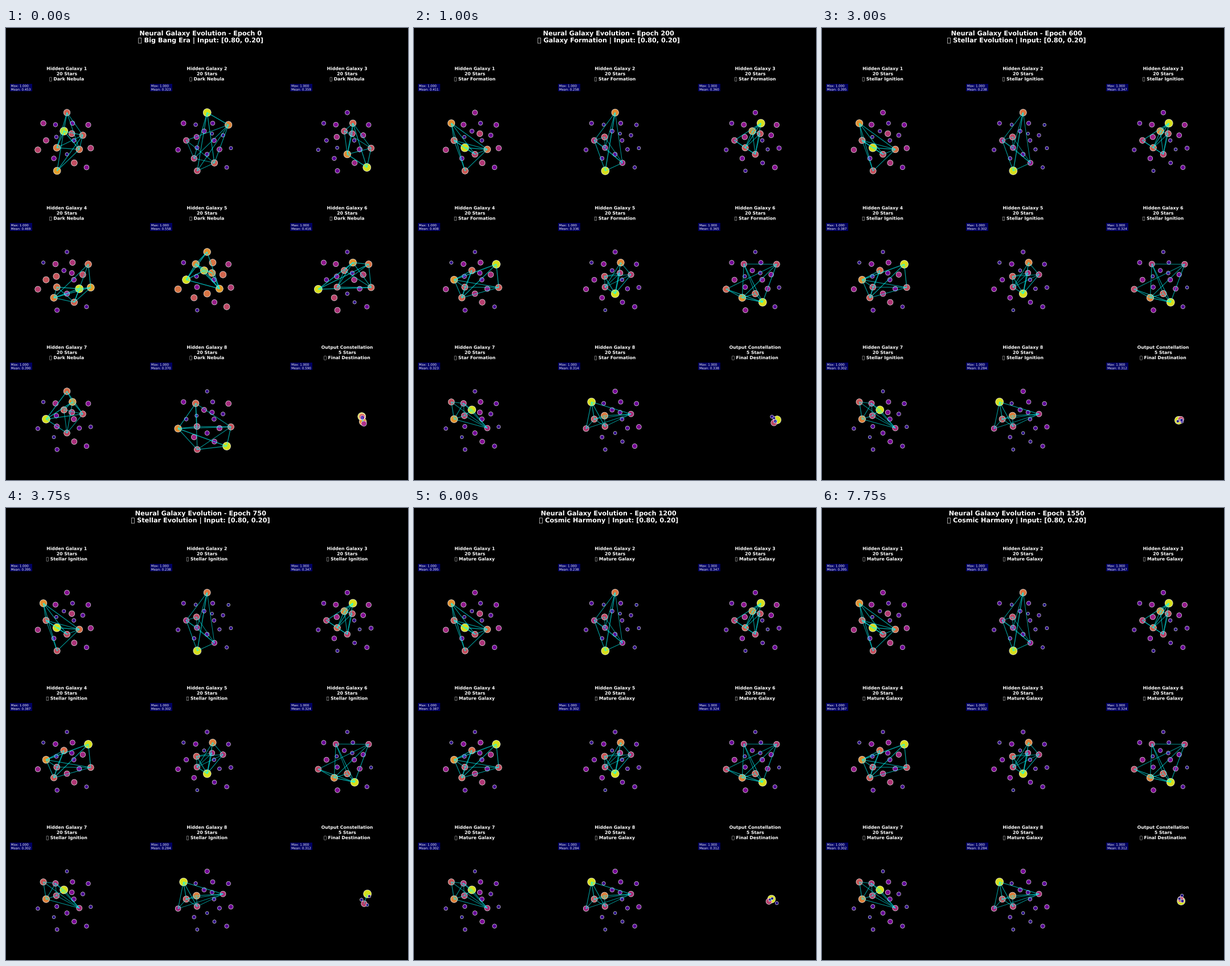
A matplotlib script for the animation above (8 s loop, 706 by 793 pixels).

```python
import itertools

import matplotlib.pyplot as plt
import numpy as np
from matplotlib.animation import FuncAnimation
from matplotlib.collections import LineCollection
from matplotlib.patches import Rectangle
from matplotlib.patheffects import Normal

W, H, DPI = 706, 793, 50
FRAMES, INTERVAL = 32, 250
COL, ROW = 246.2, 244.5
N_STARS, N_BRIGHT, N_OUT = 20, 6, 5
BOX = "\U0001F30C"  # has no glyph, so it shows as an empty box

plt.rcParams["font.family"] = "DejaVu Sans"

# Each galaxy: mean level and brightest stars, before and after learning
GALAXIES = [
    (.455, (2, 18, 4, 6, 15, 7), .395, (4, 16, 6, 10, 18, 5)),
    (.323, (15, 14, 12, 18, 11, 10), .238, (18, 15, 3, 10, 4, 12)),
    (.359, (19, 5, 8, 13, 2, 1), .347, (8, 2, 4, 1, 5, 10)),
    (.471, (6, 13, 11, 4, 14, 12), .387, (14, 10, 2, 11, 13, 4)),
    (.566, (10, 2, 6, 15, 9, 1), .302, (5, 8, 3, 4, 7, 1)),
    (.416, (17, 8, 14, 13, 2, 4), .324, (12, 11, 5, 17, 14, 9)),
    (.390, (10, 8, 15, 2, 7, 5), .302, (2, 10, 16, 3, 9, 6)),
    (.370, (19, 17, 9, 13, 18, 4), .284, (16, 3, 10, 4, 7, 17)),
]

ERAS = [(100, "Big Bang Era", "Dark Nebula"),
        (500, "Galaxy Formation", "Star Formation"),
        (1000, "Stellar Evolution", "Stellar Ignition"),
        (9999, "Cosmic Harmony", "Mature Galaxy")]


def spread_levels(mean, bright, seed):
    """Bright stars fall off from 1; the others share what the mean leaves."""
    edge = 1.3 * mean
    top = edge + (1 - edge) * np.exp(-np.arange(N_BRIGHT) / 1.8)
    n_rest = N_STARS - N_BRIGHT
    share = (mean * N_STARS - top.sum()) / n_rest
    rest = share * np.linspace(0.2, 1.8, n_rest)
    levels = np.empty(N_STARS)
    dim = np.setdiff1d(np.arange(N_STARS), bright)
    levels[np.random.default_rng(seed).permutation(dim)] = np.minimum(rest, 0.95 * edge)
    levels[list(bright)] = top
    return levels


def learn(before, after, step):
    rate = np.exp(-step / 1.7)
    levels = before * rate + after * (1 - rate)
    return levels / levels.max()


def links(places, levels):
    """Join the brightest stars, each with the next three along the spiral."""
    count = N_BRIGHT if len(levels) == N_STARS else 2
    top = np.sort(np.argsort(levels)[-count:])
    for a, b in itertools.combinations(range(count), 2):
        if b - a <= 3:
            i, j = top[a], top[b]
            yield (places[i], places[j]), 1 + 1.5 * levels[i] * levels[j]


def output_places(step):
    rng = np.random.default_rng(step + 40)
    return np.clip(rng.normal((630.5, 687), 5, (N_OUT, 2)), (620, 677), (641, 697))


turn = np.arange(N_STARS)
angle = 6 * np.pi * turn / N_STARS
radius = 12.2 * (1 + turn / 5)
SPIRAL = np.column_stack([107 + radius * np.cos(angle), 197.2 - radius * np.sin(angle)])

LEVELS = [(spread_levels(m0, b0, cell), spread_levels(m1, b1, cell))
          for cell, (m0, b0, m1, b1) in enumerate(GALAXIES)]
LEVELS.append((np.linspace(1, 0.18, N_OUT), np.array([1, 0.5, 0.04, 0.02, 0])))

fig = plt.figure(figsize=(W / DPI, H / DPI), dpi=DPI, facecolor="black")
ax = fig.add_axes([0, 0, 1, 1])
ax.set_xlim(0, W)
ax.set_ylim(H, 0)
ax.axis("off")


def write(x, y, text, size, **style):
    # drawn as outlines, so that lines may sit between whole pixels
    return ax.text(x, y, text, size=size, color="white", va="baseline",
                   path_effects=[Normal()], **style)


def heading(x, y, text, size):
    return write(x, y, text, size, weight="bold", ha="center")


stars = ax.scatter([], [], edgecolors=(1, 1, 1, 0.9), linewidths=1, zorder=2)
lines = LineCollection([], colors="cyan", alpha=0.6, zorder=3)
ax.add_collection(lines, autolim=False)
epoch_text = heading(342.3, 13, "", 16.2)
era_text = heading(342, 25.2, "", 16.2)

offsets, states, means = [], [], []
for cell in range(9):
    dx, dy = cell % 3 * COL, cell // 3 * ROW
    offsets.append((dx, dy))
    name, count = (f"Hidden Galaxy {cell + 1}", N_STARS) if cell < 8 else \
                  ("Output Constellation", N_OUT)
    heading(107 + dx, 73.8 + dy, name, 11.1)
    heading(107 + dx, 82.9 + dy, f"{count} Stars", 11.1)
    states.append(heading(107 + dx, 92 + dy, f"{BOX} Final Destination", 11.1))
    ax.add_patch(Rectangle((7 + dx, 97.8 + dy), 38.6, 13.2, lw=0,
                           facecolor="darkblue", alpha=0.7))
    write(8.7 + dx, 103.5 + dy, "Max: 1.000", 8)
    means.append(write(8.7 + dx, 109.7 + dy, "", 8))


def draw(step):
    epoch = step * 50
    era, state = next(names for limit, *names in ERAS if epoch < limit)
    epoch_text.set_text(f"Neural Galaxy Evolution - Epoch {epoch}")
    era_text.set_text(f"{BOX} {era} | Input: [0.80, 0.20]")

    places, levels, segments, widths = [], [], [], []
    for cell, (before, after) in enumerate(LEVELS):
        v = learn(before, after, step)
        spots = SPIRAL + offsets[cell] if cell < 8 else output_places(step)
        places.append(spots)
        levels.append(v)
        for segment, width in links(spots, v):
            segments.append(segment)
            widths.append(width)
        means[cell].set_text(f"Mean: {v.mean():.3f}")
        if cell < 8:
            states[cell].set_text(f"{BOX} {state}")

    v = np.concatenate(levels)
    stars.set_offsets(np.concatenate(places))
    stars.set_sizes(50 + 350 * v)
    stars.set_facecolors(plt.cm.plasma(v, alpha=0.9))
    lines.set_segments(segments)
    lines.set_linewidths(widths)
    return [stars, lines, epoch_text, era_text, *states, *means]


anim = FuncAnimation(fig, draw, frames=FRAMES, interval=INTERVAL, repeat=True, repeat_delay=0)
plt.show()
```
